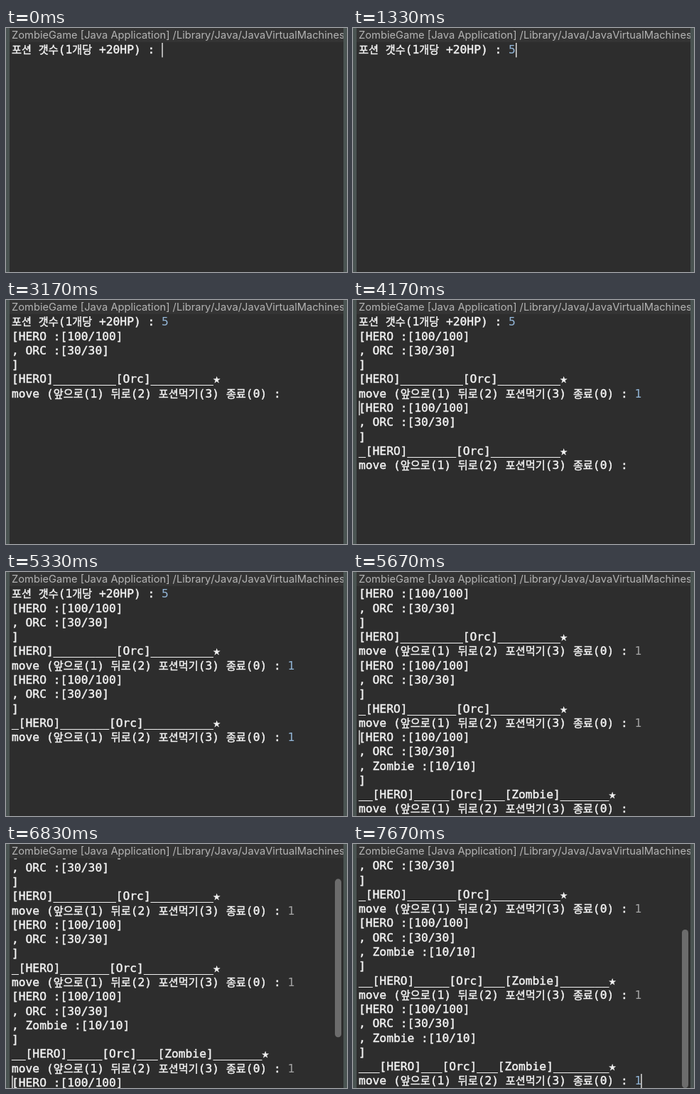
Recreate the animation shown at these times as an HTML page. Size 480 by 345 pixels, loop 8 s.

```html
<!DOCTYPE html>
<html lang="ko">
<head>
<meta charset="utf-8">
<title>Zombie game console</title>
<style>
  html, body { margin: 0; width: 100%; height: 100%; overflow: hidden; background: #2d2d2d; }
  svg { display: block; width: 480px; height: 345px; }
  text { white-space: pre; }
  .title { font: 14.7px Inter, "Open Sans", sans-serif; font-kerning: none; fill: #b4b4b4; }
  /* a thin outline gives the text its medium weight */
  .line {
    font: 16.25px "DejaVu Sans Mono", "Noto Sans Mono", monospace;
    fill: #f2f2f2; stroke: #f2f2f2; stroke-width: 0.45px;
  }
  .ko { font-family: "Noto Sans CJK KR", "Noto Sans CJK", sans-serif; font-size: 15.2px; }
  .answer { fill: #a3a3a3; stroke: none; }
  .answer.fresh { fill: #92b5d6; }
</style>
</head>
<body>
<svg viewBox="0 0 480 345">
  <defs>
    <clipPath id="pane"><rect x="5" y="20.5" width="470" height="325"/></clipPath>
    <clipPath id="head"><rect x="5" width="470" height="20"/></clipPath>
  </defs>
  <rect width="480" height="345" fill="#2d2d2d"/>
  <rect width="480" height="20" fill="#343434"/>
  <text class="title" x="8" y="15" clip-path="url(#head)">ZombieGame [Java Application] /Library/Java/JavaVirtualMachines</text>
  <g clip-path="url(#pane)">
    <g id="log"></g>
  </g>
  <rect id="bar" x="463" width="9" rx="4.5"/>
  <rect width="5" height="345" fill="#4a5452"/>
  <rect x="475" width="5" height="345" fill="#4a5452"/>
</svg>
<script>
const LOOP = 8000, LEFT = 8, TOP = 20.6, ROW = 20.27, VISIBLE_ROWS = 16;
const TRACK = { top: 23, height: 322 };
const SVG = 'http://www.w3.org/2000/svg';

const MOVE = 'move (앞으로(1) 뒤로(2) 포션먹기(3) 종료(0) : ';
const HERO = '[HERO :[100/100]', ORC = ', ORC :[30/30]', ZOMBIE = ', Zombie :[10/10]';
const gap = n => '_'.repeat(n);

const lines = [
  '포션 갯수(1개당 +20HP) : ',
  HERO, ORC, ']', `[HERO]${gap(9)}[Orc]${gap(9)}★`, MOVE,
  HERO, ORC, ']', `_[HERO]${gap(7)}[Orc]${gap(10)}★`, MOVE,
  HERO, ORC, ZOMBIE, ']', `__[HERO]${gap(5)}[Orc]___[Zombie]${gap(7)}★`, MOVE,
  HERO, ORC, ZOMBIE, ']', `___[HERO]___[Orc]___[Zombie]${gap(8)}★`, MOVE
];
const answers = new Map([[0, '5'], [5, '1'], [10, '1'], [16, '1'], [22, '1']]);
const promptRows = [...answers.keys()];

// Caret columns in pixels
const START = 8.2, ASK = 219.3, ASKED = 229, MOVED = 405.2;

// Scrollbar shades
const BRIGHT = '#929292', DIM = '#6c6c6c';

// time, rows printed, answers typed, scroll in rows, caret row, caret x, scrollbar shade
const steps = [
  [0, 1, 0, 0, 0, ASK],
  [170, 1, 0, 0],
  [830, 1, 0, 0, 0, ASK],
  [1330, 1, 1, 0, 0, ASKED],
  [1670, 6, 1, 0, 1, START],
  [2170, 6, 1, 0],
  [2670, 6, 1, 0, 1, START],
  [3170, 6, 1, 0],
  [3670, 6, 2, 0, 5, MOVED],
  [3830, 11, 2, 0, 6, START],
  [4330, 11, 2, 0],
  [4830, 11, 2, 0, 6, START],
  [5000, 11, 3, 0, 10, MOVED],
  [5330, 11, 3, 0],
  [5670, 17, 3, 1, 11, START],
  [5830, 17, 3, 1, 11, START, BRIGHT],
  [6170, 17, 3, 1, null, 0, BRIGHT],
  [6330, 17, 4, 1, 16, MOVED, BRIGHT],
  [6830, 23, 4, 1.88, 17, START, DIM],
  [7000, 23, 4, 7, 17, START, DIM],
  [7330, 23, 4, 7, null, 0, DIM],
  [7670, 23, 5, 7, 22, MOVED, DIM]
];

const log = document.getElementById('log');
const bar = document.getElementById('bar');

function add(parent, tag, attrs, content = '') {
  const node = document.createElementNS(SVG, tag);
  for (const [key, value] of Object.entries(attrs)) node.setAttribute(key, value);
  node.textContent = content;
  return parent.appendChild(node);
}

const show = (node, on) => node.setAttribute('visibility', on ? 'visible' : 'hidden');

const rows = lines.map((line, i) => {
  const text = add(log, 'text', { class: 'line', x: LEFT, y: TOP + i * ROW + 15.8 });
  for (const part of line.match(/[가-힣]+|[^가-힣]+/g)) {
    add(text, 'tspan', { class: /[가-힣]/.test(part) ? 'ko' : 'en' }, part);
  }
  const answer = answers.has(i) ? add(text, 'tspan', { class: 'answer' }, answers.get(i)) : null;
  return { text, answer };
});
const caret = add(log, 'rect', { width: 1.5, height: 20.5, fill: '#dcdcdc' });

function render([, printed, typed, scroll, caretRow = null, caretX = 0, barShade = null]) {
  log.setAttribute('transform', `translate(0 ${-scroll * ROW})`);
  rows.forEach(({ text, answer }, i) => {
    show(text, i < printed);
    if (!answer) return;
    show(answer, i < printed && promptRows.indexOf(i) < typed);
    answer.classList.toggle('fresh', scroll === 0 || caretRow === i);
  });

  show(caret, caretRow !== null);
  caret.setAttribute('x', caretX);
  caret.setAttribute('y', TOP + (caretRow ?? 0) * ROW + 0.4);

  show(bar, barShade !== null);
  bar.setAttribute('fill', barShade ?? 'none');
  bar.setAttribute('y', TRACK.top + TRACK.height * scroll / printed);
  bar.setAttribute('height', TRACK.height * Math.min(1, VISIBLE_ROWS / printed));
}

const origin = performance.now();
let current = null;

function tick() {
  const time = (performance.now() - origin) % LOOP;
  const step = steps.findLast(([at]) => at <= time);
  if (step !== current) render(current = step);
  requestAnimationFrame(tick);
}
tick();
</script>
</body>
</html>
```
